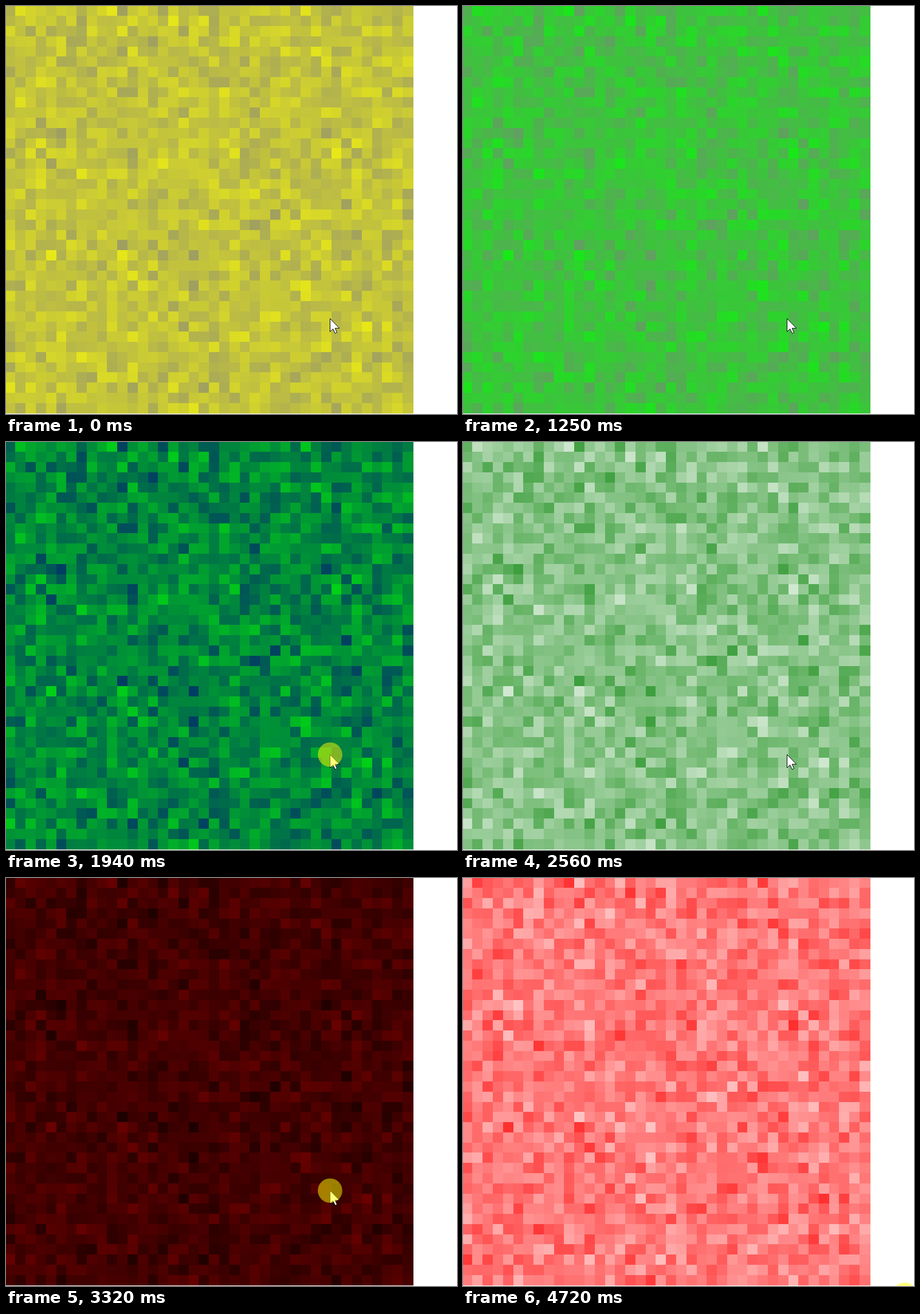
An HTML page with a canvas that plays this animation: 787 px wide and 712 px high, repeating every 4960 ms.

```html
<!DOCTYPE html>
<html lang="en">
<head>
<meta charset="utf-8">
<title>Two-colour noise grid</title>
<style>
  html, body { margin: 0; width: 787px; height: 712px; overflow: hidden; background: #fff; }
  canvas { display: block; }
</style>
</head>
<body>
<canvas width="787" height="712"></canvas>
<script>
const ctx = document.querySelector('canvas').getContext('2d');
const LOOP = 4960, SIZE = 40, EDGE = 711, PITCH = EDGE / SIZE;
const LEAVE = 3710, GONE = 4260, REST = 4340;
const HOME = [565.5, 545.5], EXIT = [774.5, 722], END = [771, 727];

// Start time, colour for value 0, colour for value 1
const palettes = [
  [0, 'gray', 'yellow'],
  [390, 'olive', 'silver'],
  [480, 'teal', 'silver'],
  [780, 'aqua', 'maroon'],
  [870, 'purple', 'silver'],
  [1250, 'gray', 'lime'],
  [1345, 'olive', 'aqua'],
  [1440, 'green', 'silver'],
  [1540, 'teal', 'yellow'],
  [1630, 'teal', 'lime'],
  [1940, 'navy', 'lime'],
  [2160, 'green', 'silver'],
  [2560, 'green', 'white'],
  [2870, 'gray', 'olive'],
  [3020, 'maroon', 'gray'],
  [3320, 'black', 'maroon'],
  [3540, 'white', 'red']
];

// Spans in which the mouse button is down
const presses = [[250, 480], [780, 1010], [1345, 1630], [1940, 2160],
  [2710, 3020], [3320, LEAVE], [GONE, 4480], [4720, LOOP]];

let seed = 20;
function random() {
  seed = (Math.imul(seed, 1664525) + 1013904223) >>> 0;
  return seed / 2 ** 32;
}

// Bell-shaped values, most of them close to the middle
const values = Array.from({ length: SIZE * SIZE }, () => {
  const mean = (random() + random() + random() + random()) / 4;
  return 0.52 + (mean - 0.5) * 0.75;
});

// Cell borders; the columns start slightly left of the stage
const borders = offset => Array.from({ length: SIZE + 1 }, (_, i) =>
  i < SIZE ? Math.max(0, Math.floor(PITCH * i - offset)) : EDGE);
const xs = borders(0.8), ys = borders(0);

function drawGrid(low, high) {
  ctx.fillStyle = low;
  ctx.fillRect(0, 0, EDGE, EDGE);
  ctx.fillStyle = high;
  values.forEach((value, i) => {
    const col = i % SIZE, row = Math.floor(i / SIZE);
    ctx.globalAlpha = value;
    ctx.fillRect(xs[col], ys[row], xs[col + 1] - xs[col], ys[row + 1] - ys[row]);
  });
  ctx.globalAlpha = 1;
}

function pointerAt(t) {
  if (t < LEAVE) return HOME;
  if (t >= REST) return END;
  if (t >= GONE) return EXIT;
  // Seven hard steps along an eased path
  const p = Math.min(7, Math.floor((t - LEAVE) / 81.6) + 1) / 7;
  const eased = p * p * (3 - 2 * p);
  return HOME.map((from, i) => from + (EXIT[i] - from) * eased);
}

const arrow = new Path2D('M.5.5V23.5L5.7 18.6 9.4 26.3 12.7 24.8 9.2 17.3H16.7Z');

function drawPointer(t) {
  const [x, y] = pointerAt(t);
  ctx.save();
  ctx.translate(x - 0.5, y - 0.5);
  ctx.fillStyle = '#fff';
  ctx.strokeStyle = '#000';
  ctx.fill(arrow);
  ctx.stroke(arrow);
  ctx.restore();
  if (presses.some(([from, to]) => t >= from && t < to)) {
    ctx.fillStyle = 'rgba(255, 255, 0, .5)';
    ctx.beginPath();
    ctx.arc(x, y, 21.3, 0, Math.PI * 2);
    ctx.fill();
  }
}

const start = performance.now();
function draw() {
  const t = (performance.now() - start) % LOOP;
  const [, low, high] = palettes.findLast(([from]) => t >= from);
  ctx.clearRect(0, 0, 787, 712);
  drawGrid(low, high);
  drawPointer(t);
  requestAnimationFrame(draw);
}
draw();
</script>
</body>
</html>
```
